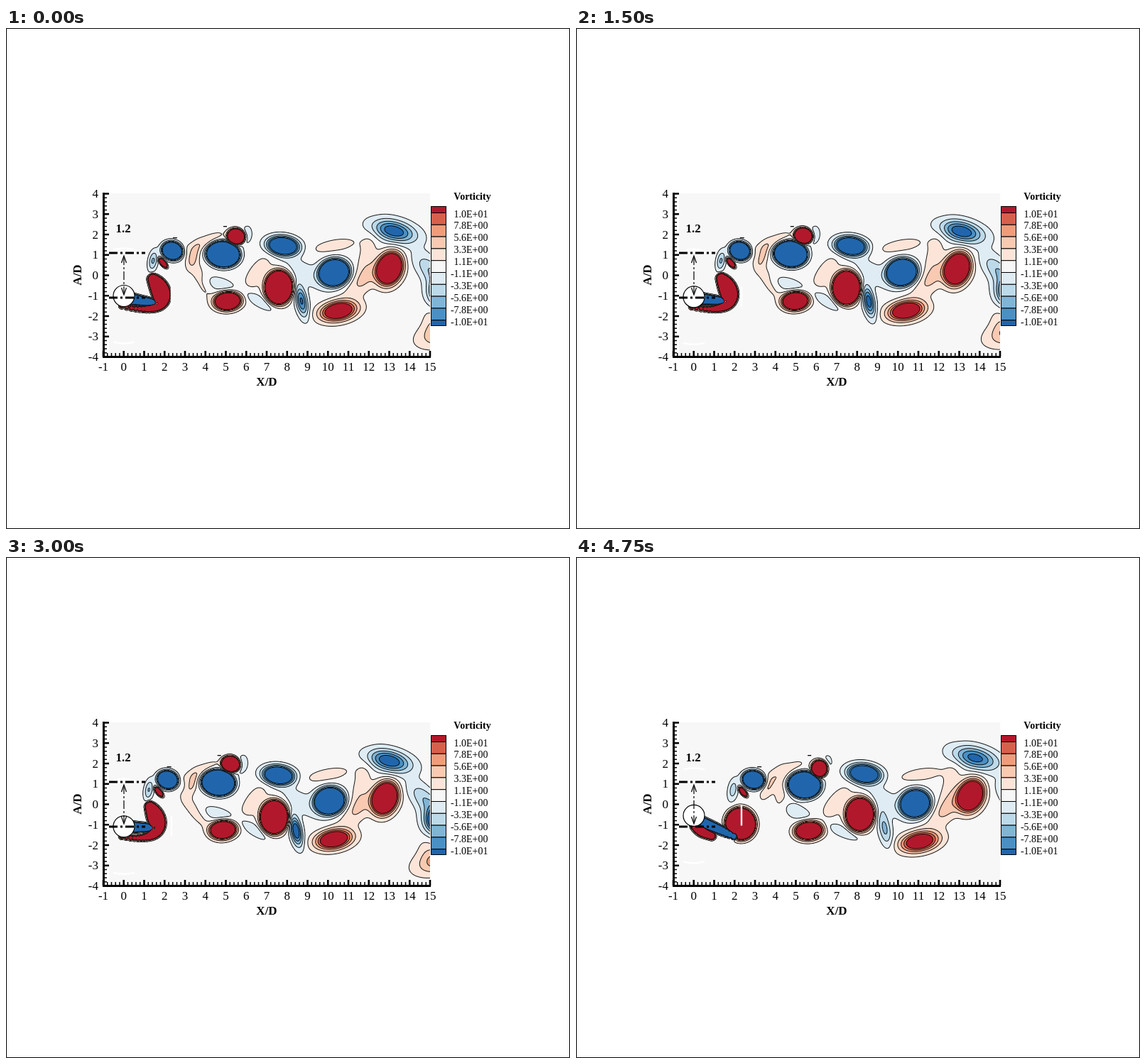
An HTML page with a canvas that plays this animation: 794x706 px, repeating every 5 s.

```html
<!DOCTYPE html>
<html lang="en">
<head>
<meta charset="utf-8">
<title>Vorticity behind an oscillating cylinder</title>
<style>
  html, body { margin: 0; width: 100%; height: 100%; overflow: hidden; background: #fff; }
  #stage { position: relative; width: 794px; height: 706px; }
  canvas { position: absolute; left: 145px; top: 233px; }
  svg { position: absolute; left: 0; top: 0; }
  text { font-family: "Liberation Serif", "Times New Roman", serif; font-size: 17px; }
  .bold { font-weight: bold; }
  .legend { font-size: 14px; }
</style>
</head>
<body>
<div id="stage">
  <canvas id="field" width="452" height="230"></canvas>
  <svg id="plot" width="794" height="706" viewBox="0 0 794 706"></svg>
</div>
<script>
const W = 452, H = 230, LEFT = 145, TOP = 233;
const MID = 348.5, UNIT = 28.75, ORIGIN = 166, SWING = 1.1 * UNIT;
const STEP = 250, STEPS = 20, PHASE_STEP = 0.1632;
const LEVELS = [-10, -7.8, -5.6, -3.3, -1.1, 1.1, 3.3, 5.6, 7.8, 10];
const COLORS = ['#2166ac', '#4a90c4', '#80b5d6', '#bddaea', '#dfecf4', '#f7f7f7',
                '#fce5d8', '#f9c9b2', '#f09c7b', '#d7604d', '#b2182b'];
const RGB = COLORS.map(c => [1, 3, 5].map(i => parseInt(c.slice(i, i + 2), 16)));

const { exp, cos, sin, PI, min, max, abs, hypot } = Math;
const turn = a => cos(2 * PI * a);
const clamp = v => min(1, max(0, v));
const smooth = v => clamp(v) ** 2 * (3 - 2 * clamp(v));
const bodyY = phase => MID + SWING * turn(phase + .065);

// Every structure is a function of its age in periods. A new copy starts each
// half period, mirrored about the wake axis and with opposite sign.
const vortices = [
  { sign: -1, odd: 0, from: -.27, to: 2.6, at: a => ({       // outer row
    x: 234 + 156 * a, y: 314 - 7 * a * a,
    rx: 20 + 13 * max(0, a), ry: 17 + 2.5 * a,
    angle: 18 * exp(-5 * max(0, a)) + 7 * a, peak: 83 * exp(-.95 * a) }) },
  { sign: -1, odd: 1, from: .08, to: 2.6, at: a => ({        // inner row
    x: 228 + 156 * a - 27 * exp(-8 * a), y: 305 + 26.5 * a + 30 * exp(-8 * a),
    rx: 28 - 2 * turn(a), ry: 25 + 3.2 * a + 3.5 * turn(a),
    angle: 15 - 18 * a, peak: 400 * exp(-1.15 * a) }) },
  { sign: 1, odd: 1, from: .25, to: 2.5, at: a => ({         // satellite sheared into a strip
    x: 232 + 184 * a, y: 336 - 75 * exp(-1.15 * a),
    rx: 8 + 16 * exp(-1.4 * a), ry: 14 + 19 * smooth(2 * a - 1),
    angle: 12, peak: 5200 * exp(-6.4 * a) + 1.8 }) },
  { sign: 1, odd: 0, from: -.2, to: 3, at: a => ({           // band linking the rows
    x: 264 + 60 * a + 30 * a * a, y: 322 + 30 * a - 7 * a * a,
    rx: 18 + 9 * a, ry: 8 + 3.2 * a,
    angle: -40 - 30 * turn(a) * max(0, 1 - a / 2), peak: 2 + 1.3 * (a - 1.1) ** 2 }) },
  { sign: 1, odd: 0, from: -.2, to: 1.3, at: a => ({         // trailing arc
    x: 272 + 150 * a + 40 * a * a, y: 306 + 44 * exp(-4 * a),
    rx: 27, ry: 8, angle: 175 - 110 * exp(-3 * a), peak: 2 + 1.2 * sin(PI * a) ** 2 }) },
  fleeting(1, 280, 302, 27, 8, -25, 2.6),
  fleeting(-1, 338, 292, 8, 13, 10, 2.4),
  fleeting(-1, 207, 328, 8, 18, 10, 6),
  fleeting(1, 221, 331, 11, 5, 50, 60),
  fleeting(1, 600, 410, 11, 17, 0, 2.2)
];

function fleeting(sign, x, y, rx, ry, angle, peak) {
  return { sign, odd: 0, from: -.25, to: .3, at: a =>
    ({ x: x + 140 * a, y, rx, ry, angle, peak: peak * exp(-((a / .2) ** 2)) }) };
}

// Shear layers: Bezier control points and half width along the curve.
const layers = [
  { sign: 1, from: -.26, to: .08, at: a => ({                // hook that rolls up
    points: [[163, bodyY(a) + 14], [222 + 130 * a, 406 + 60 * a],
             [230 + 200 * a, 380 + 20 * a], [207 + 100 * a, 354 + 50 * a]],
    width: t => 2.5 + (10 + 20 * a) * sin(.85 * PI * t * t) }) },
  { sign: 1, from: .08, to: .7, at: a => {                   // strand left on the body
    const y = bodyY(a), sway = 35 * turn(a - .2), bend = [176, y + (.9 - a) * sway];
    return { points: [[ORIGIN, y + .25 * sway], bend, bend, [190 + 90 * a * a, y + sway]],
             width: t => 9 - 4 * t };
  } }
];

const field = new Float32Array(W * H);

function stamp(x0, y0, x1, y1, value) {
  const ax = max(0, Math.floor(x0 - LEFT)), bx = min(W - 1, Math.ceil(x1 - LEFT));
  const ay = max(0, Math.floor(y0 - TOP)), by = min(H - 1, Math.ceil(y1 - TOP));
  for (let j = ay; j <= by; j++)
    for (let i = ax; i <= bx; i++) field[j * W + i] += value(i + LEFT + .5, j + TOP + .5);
}

function addVortex({ x, y, rx, ry, angle, peak }, sign, flip) {
  if (peak < .1) return;
  const side = flip ? -1 : 1, turned = side * angle * PI / 180;
  const c = cos(turned), s = sin(turned), cy = MID + side * (y - MID);
  const k = max(.3, Math.log(peak / 1.1));
  const reach = Math.sqrt(Math.log(peak / .04) / k) * max(rx, ry);
  stamp(x - reach, cy - reach, x + reach, cy + reach, (px, py) => {
    const u = ((px - x) * c + (py - cy) * s) / rx, v = ((py - cy) * c - (px - x) * s) / ry;
    return side * sign * peak * exp(-k * (u * u + v * v));
  });
}

function addLayer({ points, width }, sign, flip) {
  const side = flip ? -1 : 1, dots = [];
  for (let t = 0; t <= 1; t += 1 / 24) {
    const u = 1 - t, weights = [u * u * u, 3 * u * u * t, 3 * u * t * t, t * t * t];
    const along = axis => points.reduce((sum, p, i) => sum + weights[i] * p[axis], 0);
    dots.push([along(0), MID + side * (along(1) - MID), width(t)]);
  }
  const xs = dots.map(d => d[0]), ys = dots.map(d => d[1]), pad = 20;
  stamp(min(...xs) - pad, min(...ys) - pad, max(...xs) + pad, max(...ys) + pad, (px, py) => {
    let depth = -99;
    for (const [x, y, w] of dots) depth = max(depth, w - hypot(px - x, py - y));
    return side * sign * min(300, 10 * exp(depth / 1.1));
  });
}

// Logarithmic above the top level, so that steep cores keep thin outlines.
const compress = v => abs(v) < 10 ? v : Math.sign(v) * (10 + 10 * Math.log(abs(v) / 10));

function shade() {
  const image = new ImageData(W, H);
  for (let n = 0; n < field.length; n++) field[n] = compress(field[n]);
  for (let j = 0; j < H; j++) for (let i = 0; i < W; i++) {
    const n = j * W + i, v = field[n];
    const l = i ? n - 1 : n, r = i < W - 1 ? n + 1 : n;
    const u = j ? n - W : n, d = j < H - 1 ? n + W : n;
    const slope = hypot((field[r] - field[l]) / 2, (field[d] - field[u]) / 2) + 1e-4;
    let band = 0, gap = 99;
    for (const level of LEVELS) {
      if (v > level) band++;
      gap = min(gap, abs(v - level));
    }
    const light = 1 - .9 * clamp(1 - gap / slope);
    for (let k = 0; k < 3; k++) image.data[n * 4 + k] = RGB[band][k] * light;
    image.data[n * 4 + 3] = 255;
  }
  return image;
}

// Position within the half period, and the number of half periods passed.
function phaseAt(step) {
  const total = step * PHASE_STEP + .07, half = Math.floor(total / .5);
  return { phase: total - half * .5 - .07, half };
}

function render(step) {
  const { phase, half } = phaseAt(step);
  field.fill(0);
  const spread = (list, draw) => list.forEach(({ sign, odd = 0, from, to, at }) => {
    for (let j = -1; j < 7; j++) {
      const age = phase + j / 2;
      if (age >= from && age <= to) draw(at(age), sign, (half + j + odd) & 1);
    }
  });
  spread(vortices, addVortex);
  spread(layers, addLayer);
  return shade();
}

const svg = document.getElementById('plot');
function add(tag, attrs, content, parent = svg) {
  const el = document.createElementNS('http://www.w3.org/2000/svg', tag);
  for (const key in attrs) el.setAttribute(key, attrs[key]);
  if (content !== undefined) el.textContent = content;
  return parent.appendChild(el);
}
const path = (d, width, more = {}, parent = svg) =>
  add('path', { d, fill: 'none', stroke: '#000', 'stroke-width': width, ...more }, undefined, parent);
const label = (x, y, words, anchor = 'middle', cls = '') =>
  add('text', { x, y, 'text-anchor': anchor, class: cls }, words);

path('M.5 .5H793.5V705.5H.5Z', 1);

const body = add('g', {});
path('M-15 -65Q-8 -67 0 -67T15 -65M-15 65Q-8 67 0 67T15 65M67 -15V14', 2.4, { stroke: '#fff' }, body);
add('circle', { r: 15, fill: '#fff', stroke: '#000', 'stroke-width': 1.2 }, undefined, body);

// Amplitude markers
path('M145 317H196M145 380H196', 2.8, { 'stroke-dasharray': '12 4 3 4' });
path('M166 322V375', 1.2, { 'stroke-dasharray': '12 3 3 3' });
path('M162.5 331L166 321L169.5 331M162.5 366L166 376L169.5 366', 1.2);
label(165, 288, '1.2', 'middle', 'bold');

// Axes
let major = '', minor = '';
for (let i = 0; i <= 80; i++) {
  const x = 137 + i * UNIT / 5;
  if (i % 5) minor += `M${x} 463V458`; else {
    major += `M${x} 463V455`;
    label(x, 483, i / 5 - 1);
  }
}
for (let i = 0; i <= 40; i++) {
  const y = 233.5 + i * UNIT / 5;
  if (i % 5) minor += `M137 ${y}H142`; else {
    major += `M137 ${y}H145`;
    label(130, y + 5.5, 4 - i / 5, 'end');
  }
}
path(minor, 1.5);
path(major, 2.6);
path('M137.5 232V463.5H598', 3);
label(367, 504, 'X/D', 'middle', 'bold');
label(0, 0, 'A/D', 'middle', 'bold').setAttribute('transform', 'translate(106 348) rotate(-90)');

// Legend
label(656.5, 242, 'Vorticity', 'middle', 'bold legend');
const edges = [251.5, ...LEVELS.map((_, i) => 260.5 + i * 16.8), 419.5];
[...COLORS].reverse().forEach((fill, i) => add('rect', {
  x: 598.5, y: edges[i], width: 21, height: edges[i + 1] - edges[i], fill, stroke: '#000', 'stroke-width': 1
}));
[...LEVELS].reverse().forEach((level, i) => {
  const words = abs(level) < 10 ? level.toFixed(1) + 'E+00' : (level / 10).toFixed(1) + 'E+01';
  label(678.5, 266.5 + i * 16.95, words, 'end', 'legend');
});

const ctx = document.getElementById('field').getContext('2d');
const cache = [];
let shown = -1;

function drawSpecks({ phase, half }) {
  const speck = (x, y, w) =>
    ctx.fillRect(x + 200 * phase - LEFT, (half & 1 ? 2 * MID - y : y) - TOP, w, 1.3);
  ctx.fillStyle = '#000';
  speck(306, 279, 5);
  speck(235, 295, 6);
}

function tick() {
  const step = Math.floor(performance.now() / STEP) % STEPS;
  if (step !== shown) {
    shown = step;
    ctx.putImageData(cache[step] || (cache[step] = render(step)), 0, 0);
    drawSpecks(phaseAt(step));
    body.setAttribute('transform', `translate(${ORIGIN} ${bodyY(step * PHASE_STEP)})`);
  }
  requestAnimationFrame(tick);
}
tick();
</script>
</body>
</html>
```
